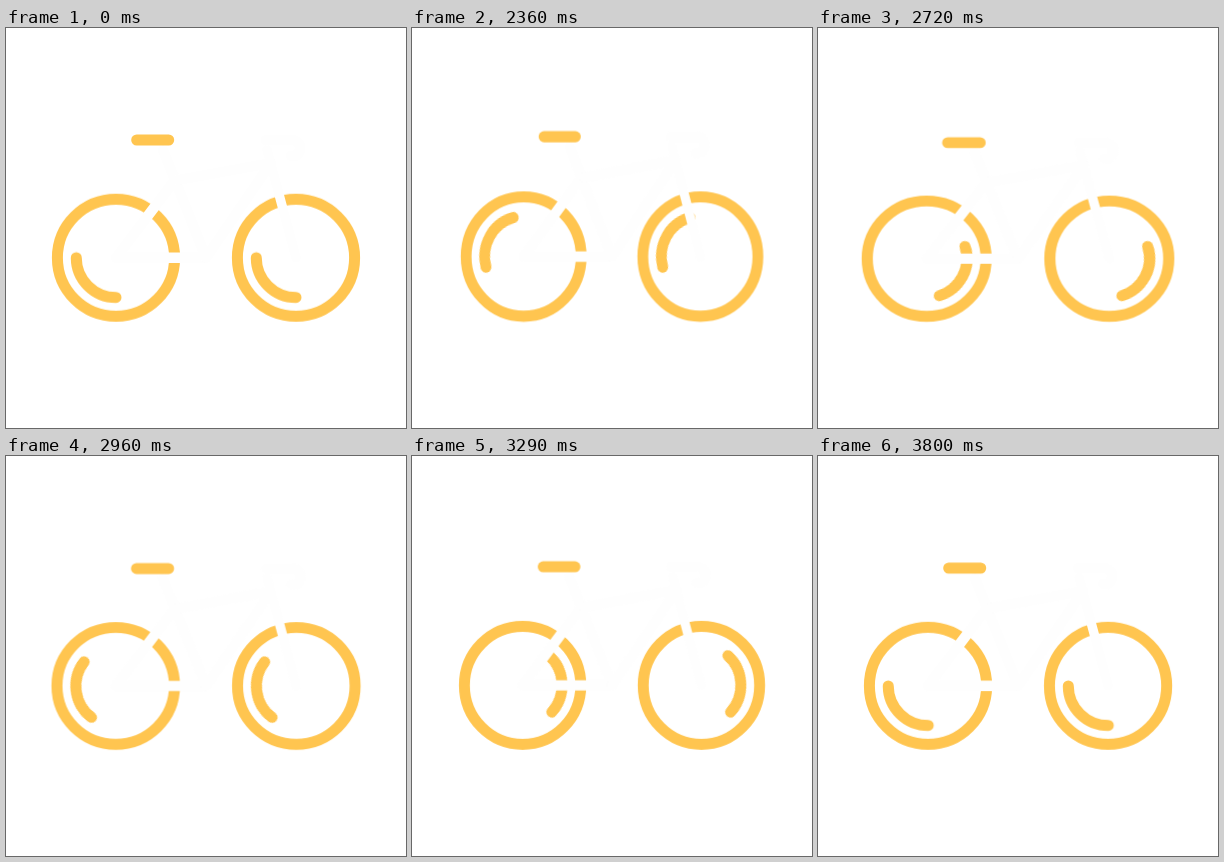
Write an HTML page that moves like this. It is 400 px wide and 400 px high and loops after 3890 ms.

```html
<!DOCTYPE html>
<html lang="en">
<head>
<meta charset="utf-8">
<title>Bicycle</title>
<style>
  html, body { margin: 0; width: 100%; height: 100%; overflow: hidden; background: #fff; }
  svg { display: block; width: 100vw; height: 100vh; }
  .bike, .glint {
    animation: 3890ms cubic-bezier(.37, 0, .63, 1) infinite;
  }
  .bike { transform-origin: 200px 294px; animation-name: bounce; }
  .glint { transform-origin: 0 0; animation-name: roll; }
  .yellow, .frame { fill: none; stroke-linecap: round; stroke-linejoin: round; }
  .yellow { stroke: #ffc550; stroke-width: 11; }
  .frame { stroke: #fefefe; stroke-width: 10.4; }

  @keyframes roll {
    0%, 50.64% { transform: rotate(0deg); }
    98.46%, 100% { transform: rotate(720deg); }
  }
  @keyframes bounce {
    0%, 50.64% { transform: scale(1, 1); }
    63.11% { transform: scale(.98, 1.02); }
    72.11% { transform: scale(1.02, .98); }
    80.98% { transform: scale(.98, 1.02); }
    90.23% { transform: scale(1.02, .98); }
    98.46%, 100% { transform: scale(1, 1); }
  }
</style>
</head>
<body>
<svg viewBox="0 0 400 400">
  <g class="bike">
    <g class="yellow">
      <g transform="translate(110 229.7)">
        <circle r="58.6"/>
        <path class="glint" d="M-39.7 0A39.7 39.7 0 0 0 0 39.7"/>
      </g>
      <g transform="translate(290 229.7)">
        <circle r="58.6"/>
        <path class="glint" d="M-39.7 0A39.7 39.7 0 0 0 0 39.7"/>
      </g>
    </g>
    <g class="frame">
      <path d="M170.5 150L110 229.8H200L157 122"/>
      <path d="M172 152L265 135L200 229.8"/>
      <path stroke-width="9.4" d="M290 229.8L261 121.5"/>
      <path d="M260 112H287Q295 114 294 122Q292 129 285 128"/>
    </g>
    <path class="yellow" d="M130.7 112H162.7"/>
  </g>
</svg>
</body>
</html>
```
